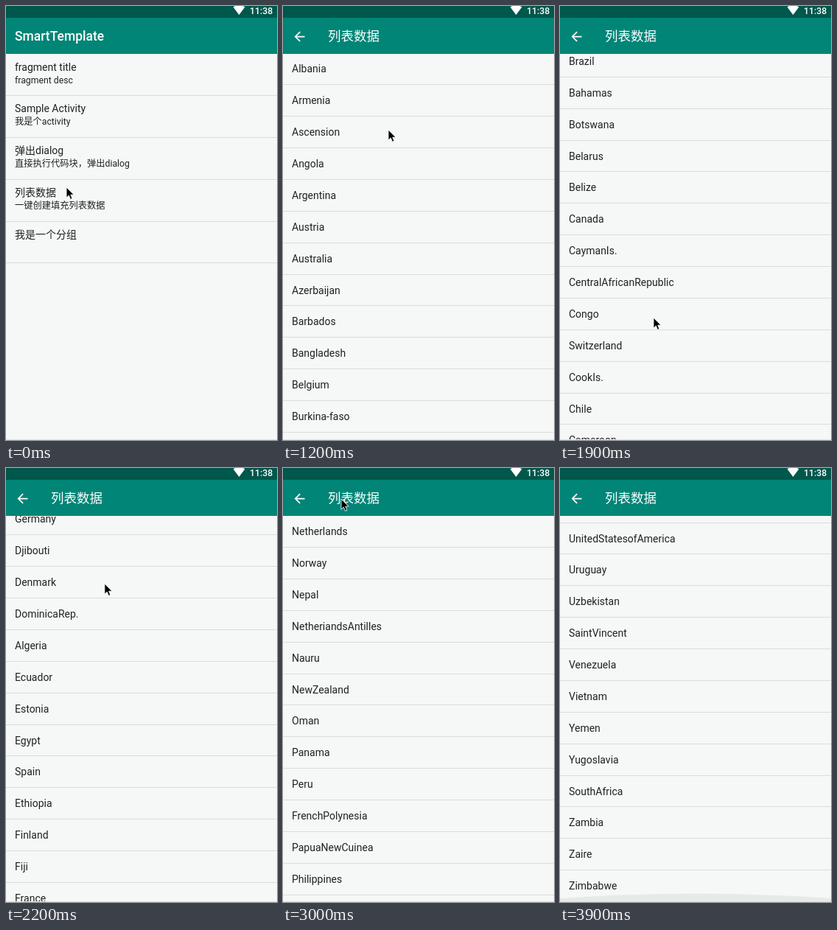
Write an HTML page that moves like this. It is 368 by 589 pixels and loops after 4000 ms.

```html
<!DOCTYPE html>
<html lang="zh-CN">
<head>
<meta charset="utf-8">
<title>SmartTemplate</title>
<style>
  * { box-sizing: border-box; margin: 0; padding: 0; }
  html, body { width: 100%; height: 100%; overflow: hidden; }
  body {
    position: relative;
    background: #f6f8f7;
    color: #202121;
    font: 14px Roboto, "Noto Sans CJK SC", "Noto Sans CJK", sans-serif;
    white-space: nowrap;
  }
  .page { position: absolute; left: 0; top: 0; width: 368px; height: 589px; overflow: hidden; background: #f6f8f7; }
  .page::after { content: ""; position: absolute; left: 0; right: 0; top: 588px; height: 1px; background: #e2e5e4; }
  header { position: absolute; width: 368px; height: 65px; background: #008577; border-top: 16px solid #00574b; }
  h1 { position: absolute; left: 12px; top: 0; font-size: 17.5px; font-weight: 500; line-height: 50px; color: #fff; }
  .detail h1 { left: 61px; font-weight: 400; }
  header svg { position: absolute; left: 12px; top: 14.5px; }
  main { position: absolute; top: 65px; width: 368px; height: 524px; overflow: hidden; }
  ul { list-style: none; }
  li { border-bottom: 1px solid #d9dcdb; padding-left: 12px; }
  .menu li { height: 56.875px; padding-top: 7.5px; line-height: 20px; }
  .menu small { display: block; font-size: 12.25px; line-height: 16px; }
  .detail li { height: 42.875px; line-height: 42px; }
  .detail li:last-child { border: 0; }
  #glow { position: absolute; left: 0; bottom: 0; transform-origin: bottom; }
  #status, #cursor { position: absolute; left: 0; top: 0; overflow: visible; }
  #status text { font-size: 12.25px; font-weight: 500; }
</style>
</head>
<body>
<section class="page menu">
  <header><h1>SmartTemplate</h1></header>
  <main><ul>
    <li>fragment title<small>fragment desc</small></li>
    <li>Sample Activity<small>我是个activity</small></li>
    <li>弹出dialog<small>直接执行代码块，弹出dialog</small></li>
    <li>列表数据<small>一键创建填充列表数据</small></li>
    <li>我是一个分组</li>
  </ul></main>
</section>
<section class="page detail" id="detail">
  <header>
    <svg width="21" height="21" viewBox="0 0 24 24" fill="#fff"><path d="M20 11H7.83l5.59-5.59L12 4l-8 8 8 8 1.41-1.41L7.83 13H20z"/></svg>
    <h1>列表数据</h1>
  </header>
  <main>
    <ul id="list"></ul>
    <svg id="glow" width="368" height="12"><path d="M0 7Q184-6 368 7V12H0z" fill="#e6eae9"/></svg>
  </main>
</section>
<svg id="status" width="368" height="16" fill="#fff">
  <path d="M308.6 1.6Q316.6-4.6 324.4 1.6L316.5 12z"/>
  <text x="331" y="11">11:38</text>
</svg>
<svg id="cursor" width="12" height="18"><path d="M0 0V14.2L3.3 11.1 5.6 16.4 8 15.3 5.8 10.2H10.2z" stroke="#fff" stroke-width=".9"/></svg>
<script>
const names = `Andorra UnitedArabEmirates Afghanistan AntiguaandBarbuda Anguilla Albania Armenia Ascension
Angola Argentina Austria Australia Azerbaijan Barbados Bangladesh Belgium Burkina-faso Bulgaria Bahrain
Burundi Benin Palestine Bermuda Brunei Bolivia Brazil Bahamas Botswana Belarus Belize Canada CaymanIs.
CentralAfricanRepublic Congo Switzerland CookIs. Chile Cameroon China Colombia CostaRica Czech Cuba Cyprus
Czech Germany Djibouti Denmark DominicaRep. Algeria Ecuador Estonia Egypt Spain Ethiopia Finland Fiji France
Gabon UnitedKingdom Grenada Georgia FrenchGuiana Ghana Gibraltar Gambia Guinea Greece Guatemala Guam Guyana
Hongkong Honduras Haiti Hungary Indonesia Ireland Israel India Iraq Iran Iceland Italy IvoryCoast Jamaica
Jordan Japan Kenya Kyrgyzstan Kampuchea NorthKorea Korea Kuwait Kazakstan Laos Lebanon St.Lucia Liechtenstein
SriLanka Liberia Lesotho Lithuania Luxembourg Latvia Libya Morocco Monaco Moldova Madagascar Mali Burma
Mongolia Macao MontserratIs. Malta MarianaIs. Martinique Mauritius Maldives Malawi Mexico Malaysia Mozambique
Namibia Niger Nigeria Nicaragua Netherlands Norway Nepal NetheriandsAntilles Nauru NewZealand Oman Panama
Peru FrenchPolynesia PapuaNewCuinea Philippines Pakistan Poland PuertoRico Portugal Paraguay Qatar Reunion
Romania Russia SaudiArabia SolomonIs. Seychelles Sudan Sweden Singapore Slovenia Slovakia SierraLeone
SanMarino SamoaEastern SanMarino Senegal Somali Suriname SaoTomeandPrincipe EISalvador Syria Swaziland Chad
Togo Thailand Tajikstan Turkmenistan Tunisia Tonga Turkey TrinidadandTobago Taiwan Tanzania Ukraine Uganda
UnitedStatesofAmerica Uruguay Uzbekistan SaintVincent Venezuela Vietnam Yemen Yugoslavia SouthAfrica Zambia
Zaire Zimbabwe`.split(/\s+/);

const $ = id => document.getElementById(id);
const [detail, list, glow, cursor] = ['detail', 'list', 'glow', 'cursor'].map($);
list.innerHTML = names.map(n => `<li>${n}</li>`).join('');

const LOOP = 4000, STEP = 100, ROW = 42.875;

// Scroll offset that puts the divider under a name at stage height y
const offset = (name, y) => 64.5 + ROW * (names.indexOf(name) + 1) - y;

const end = offset('UnitedStatesofAmerica', 116.5);
const scroll = [
  [1000, 0], [1100, 90], [1200, offset('Albania', 106.5)], [1300, 380], [1500, 710],
  [1900, offset('Brazil', 96)], [2000, 1270], [2100, 1610],
  [2600, offset('Israel', 124.5)], [2750, 3800], [3000, offset('Netherlands', 107.5)],
  [3200, 6230], [3400, offset('SamoaEastern', 130)], [3600, 7340], [3800, end]
];
const pointer = [
  [600, 82, 246], [1000, 140, 385], [1200, 143, 168], [1300, 150, 80], [1900, 127, 423],
  [2100, 130, 65], [2400, 142, 420], [2600, 143, 381], [2750, 130, 90], [2850, 110, 340],
  [3000, 79, 42], [3200, 116, 400], [3400, 113, 276], [3500, 100, 70], [3600, 92, -30]
];

// Smooth curve through the keys that never overshoots
function at(keys, t, c = 1) {
  const last = keys.length - 1;
  if (t <= keys[0][0]) return keys[0][c];
  if (t >= keys[last][0]) return keys[last][c];
  const i = keys.findIndex(k => k[0] > t) - 1;
  const rate = j => j < 0 || j >= last ? 0 : (keys[j + 1][c] - keys[j][c]) / (keys[j + 1][0] - keys[j][0]);
  const slope = j => {
    const a = rate(j - 1), b = rate(j);
    return a * b > 0 ? 2 * a * b / (a + b) : 0;
  };
  const h = keys[i + 1][0] - keys[i][0], u = (t - keys[i][0]) / h, v = 1 - u;
  return keys[i][c] * v * v * (1 + 2 * u) + keys[i + 1][c] * u * u * (3 - 2 * u)
    + h * u * v * (slope(i) * v - slope(i + 1) * u);
}

const ramp = (t, from, to) => Math.min(1, Math.max(0, (t - from) / (to - from)));

function draw(now) {
  const t = Math.floor(now % LOOP / STEP) * STEP;
  const open = ramp(t, 200, 500);
  detail.style.opacity = open;
  detail.style.transform = `translateY(${Math.round(47 * (1 - open) ** 3)}px)`;
  list.style.transform = `translateY(${-Math.round(at(scroll, t))}px)`;
  glow.style.transform = `scaleY(${ramp(t, 3700, 3900)})`;
  cursor.style.transform = `translate(${at(pointer, t, 1)}px, ${at(pointer, t, 2)}px)`;
}

const start = performance.now();
function tick() {
  draw(performance.now() - start);
  requestAnimationFrame(tick);
}
tick();
</script>
</body>
</html>
```
